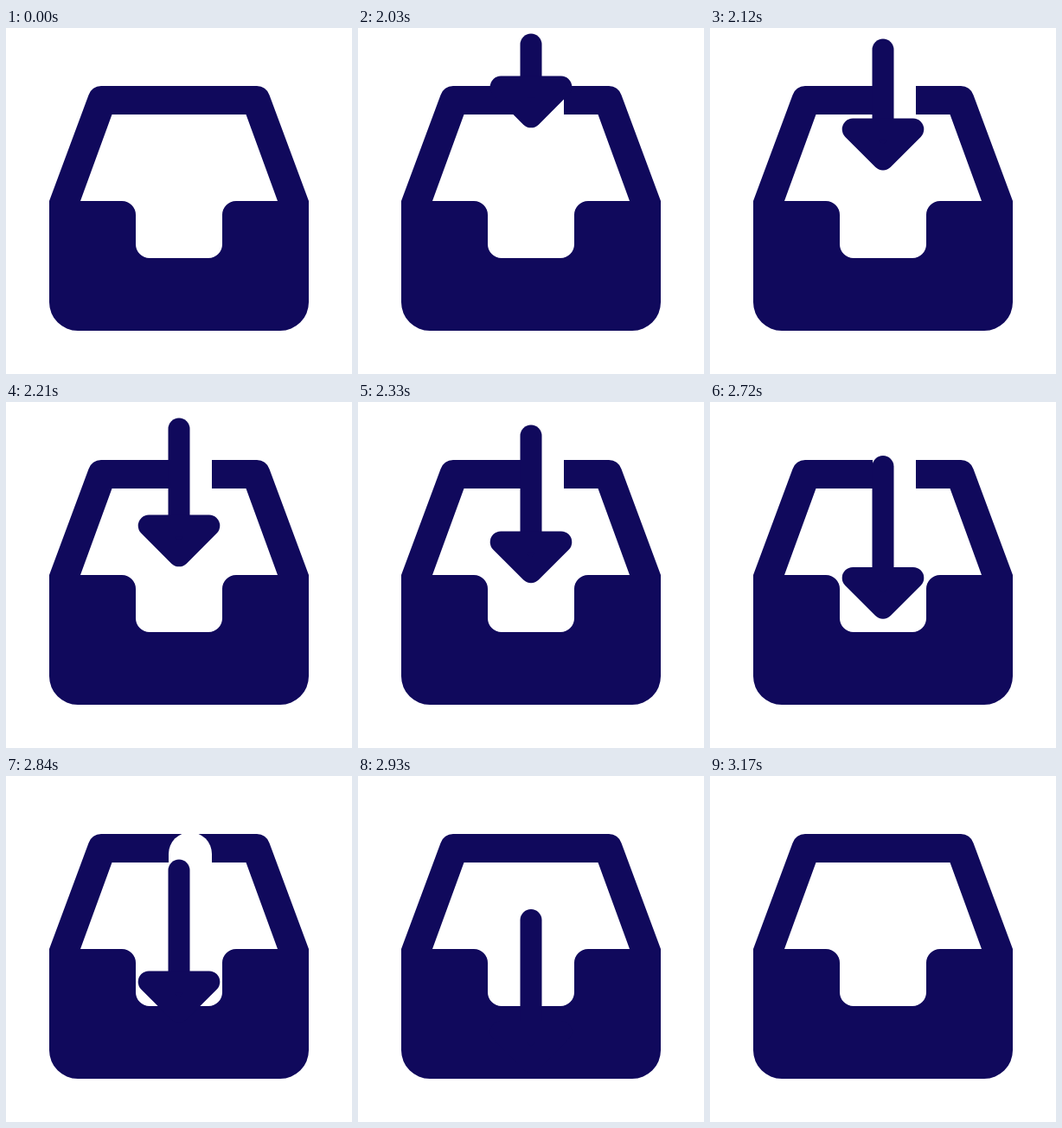
Recreate the animation shown at these times as an HTML page. Size 400 by 400 pixels, loop 3.23 s.

```html
<!DOCTYPE html>
<html lang="en">
<head>
<meta charset="utf-8">
<title>Inbox</title>
<style>
  html, body { margin: 0; height: 100%; overflow: hidden; background: #fff; }
  svg { display: block; width: 100%; height: 100%; }
  .ink { fill: #10095c; }
  .line { stroke: #10095c; stroke-width: 25; stroke-linecap: round; stroke-linejoin: round; }
</style>
</head>
<body>
<svg viewBox="0 0 400 400">
  <path class="ink" fill-rule="evenodd" d="
    M50 200 L95.5 77.5 Q99.5 67 110 67 H290 Q300.5 67 304.5 77.5 L350 200
    V317 A33 33 0 0 1 317 350 H83 A33 33 0 0 1 50 317 Z
    M122.5 100 L86 200 H134 A16 16 0 0 1 150 216 V250 A16 16 0 0 0 166 266
    H234 A16 16 0 0 0 250 250 V216 A16 16 0 0 1 266 200 H314 L277.5 100 Z"/>
  <g id="arrow">
    <line id="gap" x1="213" x2="213" y2="200" stroke="#fff" stroke-width="50" stroke-linecap="round"/>
    <line id="shaft" class="line" x1="200" x2="200"/>
    <path id="head" class="ink line" d="M165.2 12.5 H234.8 L200 47.3 Z"/>
  </g>
</svg>
<script>
const LOOP = 3230, START = 2030, END = 3020, STEP = 30, DROP = 18;
const [arrow, gap, shaft, head] =
  ["arrow", "gap", "shaft", "head"].map(id => document.getElementById(id));

function draw(now) {
  const t = now % LOOP;
  const visible = t >= START && t < END;
  arrow.setAttribute("visibility", visible ? "visible" : "hidden");

  if (visible) {
    const n = Math.floor((t - START) / STEP);
    // Steady drift, then an accelerating drop into the tray
    const fall = 3.15 * (Math.exp(0.28 * Math.max(0, n - DROP)) - 1);
    const top = 6.5 + 2 * n + fall;
    const headTop = top + 129 - 80 * Math.exp(-0.258 * n);

    gap.setAttribute("y1", Math.min(200, top - 6.5));
    shaft.setAttribute("y1", top + 12.5);
    shaft.setAttribute("y2", headTop + 12.5);
    head.setAttribute("transform", `translate(0 ${headTop})`);
  }
}

const began = performance.now();
function tick() {
  draw(performance.now() - began);
  requestAnimationFrame(tick);
}
tick();
</script>
</body>
</html>
```
